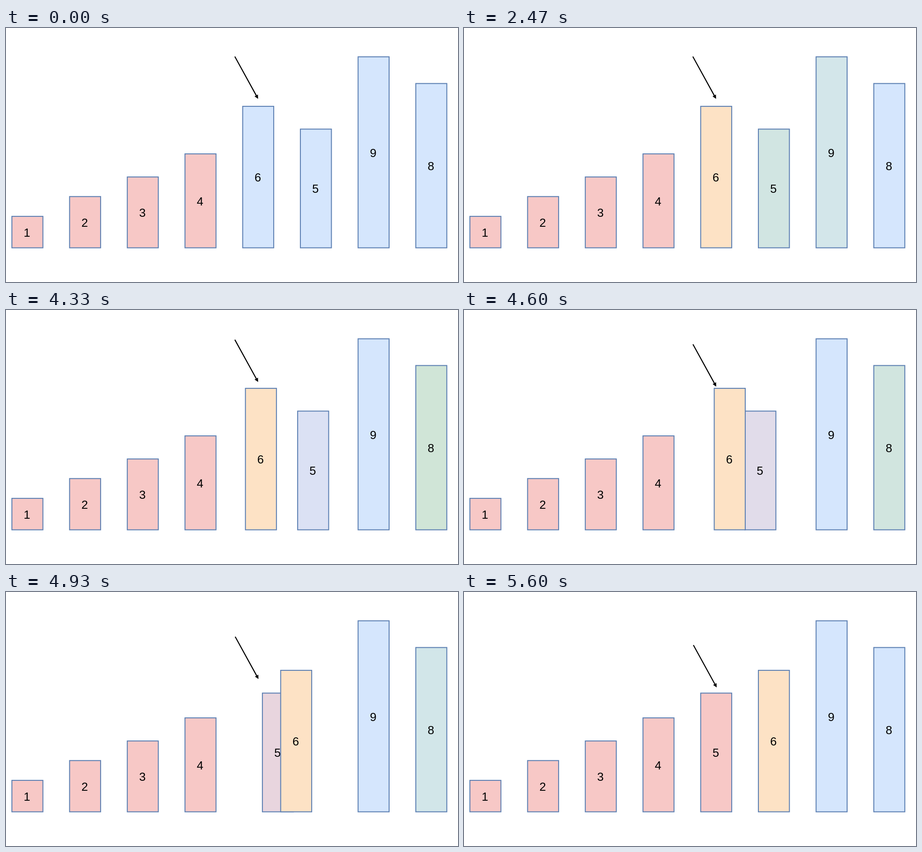
Recreate the animation shown at these times as an HTML page with a canvas. Size 998 by 561 pixels, loop 6.47 s.

```html
<!DOCTYPE html>
<html lang="en">
<head>
<meta charset="utf-8">
<title>Selection sort step</title>
<style>
  html, body { margin: 0; width: 100%; height: 100%; overflow: hidden; background: #fff; }
  canvas { display: block; }
</style>
</head>
<body>
<canvas id="stage" width="998" height="561"></canvas>
<script>
const ctx = document.getElementById('stage').getContext('2d');

const LOOP = 6470;
const STEP = 200 / 3;
const BASE = 485.5;
const BAR_WIDTH = 68.5;

const BLUE = [213, 230, 253];
const PINK = [247, 200, 198];
const ORANGE = [253, 226, 197];
const GREEN = [207, 229, 207];

const values = [1, 2, 3, 4, 6, 5, 9, 8];
const tops = [416, 372.3, 329, 278, 173, 223.3, 63.6, 122.6];
const slotX = i => 13 + 127.4 * i;

const progress = (t, start, end) => Math.min(1, Math.max(0, (t - start) / (end - start)));
const lerp = (a, b, p) => a + (b - a) * p;
const mix = (a, b, p) => a.map((v, i) => lerp(v, b[i], p));

// Cubic Bezier easing with control points (x1, 0) and (x2, 1).
function ease(p, x1 = 0.5, x2 = 0.46) {
  let lo = 0, hi = 1, s = p;
  for (let i = 0; i < 24; i++) {
    s = (lo + hi) / 2;
    const r = 1 - s;
    const x = 3 * r * r * s * x1 + 3 * r * s * s * x2 + s ** 3;
    if (x < p) lo = s; else hi = s;
  }
  return s * s * (3 - 2 * s);
}

function drawBar(index, x, color) {
  const top = tops[index];
  ctx.fillStyle = `rgb(${color.map(Math.round).join(',')})`;
  ctx.strokeStyle = '#5d80b3';
  ctx.lineWidth = 2.1;
  ctx.fillRect(x, top, BAR_WIDTH, BASE - top);
  ctx.strokeRect(x, top, BAR_WIDTH, BASE - top);
  ctx.fillStyle = '#000';
  ctx.font = '26px "Liberation Sans", Arial, sans-serif';
  ctx.textAlign = 'center';
  ctx.fillText(values[index], x + BAR_WIDTH / 2 - 0.9, (top + BASE) / 2 + 10);
}

function drawArrow(dx, dy) {
  ctx.save();
  ctx.translate(556.6 + dx, 156.4 + dy);
  ctx.rotate(Math.atan2(93.4, 51.4));
  ctx.strokeStyle = ctx.fillStyle = '#000';
  ctx.lineWidth = 2.3;
  ctx.beginPath();
  ctx.moveTo(-106.6, 0);
  ctx.lineTo(-6, 0);
  ctx.stroke();
  ctx.beginPath();
  ctx.moveTo(0, 0);
  ctx.lineTo(-8.5, -4.3);
  ctx.lineTo(-8.5, 4.3);
  ctx.fill();
  ctx.restore();
}

function draw(t) {
  const select = progress(t, 70, 1150);
  const checkFive = progress(t, 1400, 2120);
  const checkNine = progress(t, 2120, 2970);
  const checkEight = progress(t, 2970, 4070);
  const finish = progress(t, 4070, 5600);
  const swap = ease(finish);

  const five = finish > 0
    ? mix(BLUE, PINK, finish)
    : mix(BLUE, GREEN, checkFive - checkNine);
  const nine = mix(BLUE, GREEN, checkNine - checkEight);
  const eight = mix(BLUE, GREEN, checkEight - finish);

  ctx.fillStyle = '#fff';
  ctx.fillRect(0, 0, 998, 561);
  for (let i = 0; i < 4; i++) drawBar(i, slotX(i), PINK);
  drawBar(6, slotX(6), nine);
  drawBar(7, slotX(7), eight);
  drawBar(5, lerp(slotX(5), slotX(4), swap), five);
  drawBar(4, lerp(slotX(4), slotX(5), swap), mix(BLUE, ORANGE, select));
  drawArrow(1.3 * swap, 54.3 * swap);
}

const start = performance.now();
function tick() {
  const t = (performance.now() - start) % LOOP;
  draw(Math.floor((t + 4) / STEP) * STEP);
  requestAnimationFrame(tick);
}
tick();
</script>
</body>
</html>
```
